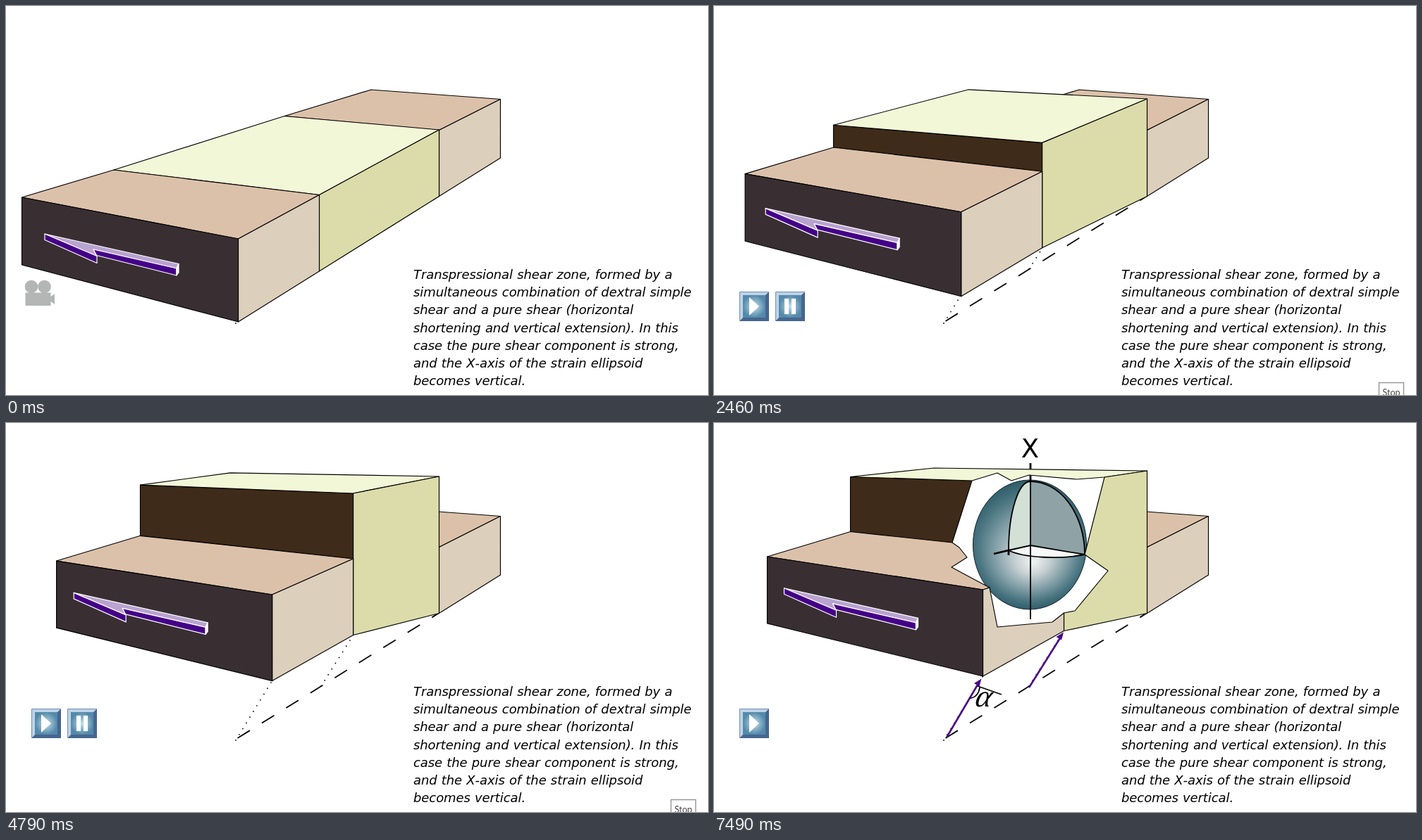
Recreate the animation shown at these times as an HTML page. Size 996x553 px, loop 7.75 s.

```html
<!DOCTYPE html>
<html lang="en">
<head>
<meta charset="utf-8">
<title>Transpressional shear zone</title>
<style>
  html, body { margin: 0; width: 100%; height: 100%; overflow: hidden; background: #fff; }
  svg { display: block; }
  text { font-family: "DejaVu Sans", Verdana, sans-serif; }
  .caption { font-size: 18px; font-style: italic; font-kerning: none; word-spacing: .034em; letter-spacing: -.005em; }
  .alpha { font: italic 44px "Liberation Serif", serif; }
  .stop { font: 12.5px Lato, sans-serif; }
  .face { stroke: #000; stroke-width: 1.15; stroke-linejoin: round; }
  .line { fill: none; stroke: #000; stroke-width: 1.8; }
  .axis { fill: none; stroke: #000; stroke-width: 2.8; }
  .arrow { stroke: #fff; stroke-width: 1.2; stroke-linejoin: round; }
</style>
</head>
<body>
<svg width="996" height="553" viewBox="0 0 996 553">
  <defs>
    <radialGradient id="ball" gradientUnits="userSpaceOnUse" cx="448" cy="173" r="94" fx="453" fy="198">
      <stop offset="0" stop-color="#f0f2f2"/>
      <stop offset=".25" stop-color="#cad2d4"/>
      <stop offset=".55" stop-color="#83a0a8"/>
      <stop offset=".8" stop-color="#4a7581"/>
      <stop offset="1" stop-color="#2b5967"/>
    </radialGradient>
    <radialGradient id="glass">
      <stop offset="0" stop-color="#c5e0ea"/>
      <stop offset="1" stop-color="#5389aa"/>
    </radialGradient>
    <g id="button">
      <path d="M0 0H42L36 6H6V36L0 42Z" fill="#bfd3e6"/>
      <path d="M42 0V42H0L6 36H36V6Z" fill="#46668f"/>
      <rect x="5" y="5" width="32" height="32" fill="url(#glass)"/>
      <path d="M.5 41.5V.5H41.5" fill="none" stroke="#6f8fb3"/>
    </g>
    <path id="head" d="M0 0L-10.5 6.5L-3 11Z" fill="#4b0c86"/>
  </defs>

  <path class="line" d="M328.5 448L614.5 270" stroke-dasharray="20.6 20"/>
  <path class="line" d="M326 451L381.5 360M447 374L496.5 295.5" stroke-dasharray="0 9.6" stroke-linecap="round"/>

  <path class="face" fill="#dcc1aa" d="M395 156.5L518 119L701.5 132.5L614.5 176.5Z"/>
  <path class="face" fill="#dccfbc" d="M614.5 176.5L701.5 132.5V216L614.5 270.5Z"/>

  <polygon id="hole" fill="#fff"/>
  <g id="sphere">
    <ellipse cx="448" cy="173" rx="80.5" ry="92" fill="url(#ball)" stroke="#10242a"/>
    <path fill="#d2e0d6" d="M449 83A31 98 0 0 0 418 181L449 174Z"/>
    <path fill="#8fa3a6" d="M449 83A77 104 0 0 1 526 187L449 174Z"/>
    <path fill="#f7f8f8" d="M418 181L449 174L526 187C492 194 440 192 418 181Z"/>
    <path class="line" d="M449 83A31 98 0 0 0 418 181C440 192 492 194 526 187A77 104 0 0 0 449 83"/>
    <path class="line" d="M449 60V279M418 181L449 174L526 187"/>
    <path class="axis" d="M449 57V82M397 186L418 181V188M535 188.5L560 193.5"/>
  </g>

  <g id="block"></g>

  <g id="arrow" class="arrow">
    <path fill="#b9a3d0" d="M55 324L245 366.5L242 373L124 346L129 355.5Z"/>
    <path fill="#440088" d="M55 324L129 355.5V365.5L55 332.5Z"/>
    <path fill="#440088" d="M124 346L242 373V383L128.5 354.5Z"/>
    <path fill="#fff" d="M242 373L245 366.5V379L242 383Z"/>
  </g>

  <g id="camera" fill="#b4b6b5">
    <circle cx="36" cy="399" r="9.3"/>
    <circle cx="54.5" cy="399" r="9.3"/>
    <path d="M27.5 407.5H63.5V413L69 409.5V424L63.5 420V426H27.5Z"/>
  </g>
  <g id="play" transform="translate(36 406)">
    <use href="#button"/>
    <path d="M14 8L28 21L14 34Z" fill="#fff"/>
  </g>
  <g id="pause" transform="translate(87 406)">
    <use href="#button"/>
    <path d="M13 10H19V32H13ZM23 10H29V32H23Z" fill="#fff"/>
  </g>

  <g id="labels">
    <text x="448.5" y="49" font-size="37" text-anchor="middle">X</text>
    <path d="M330 447L377 367M447 376L494 301" stroke="#4b0c86" stroke-width="2.6"/>
    <use href="#head" x="379.5" y="363.5"/>
    <use href="#head" x="496" y="297.5"/>
    <path class="line" d="M374 374L408 386M363 391C371 391 376 384 377 376"/>
    <text class="alpha" transform="translate(369 403) skewX(-12)">α</text>
  </g>

  <g id="caption" class="caption"></g>
  <g id="stop">
    <rect x="943.5" y="535.5" width="35" height="24" fill="#fff" stroke="#999" stroke-width="1.5"/>
    <text class="stop" x="961" y="554" text-anchor="middle" fill="#444">Stop</text>
  </g>
</svg>
<script>
const LOOP = 7750, START = 800, PAIR = 331, SHORT = 130;
const SLIDES = 27, CUTS = 9;

const $ = id => document.getElementById(id);
const add = (parent, tag, attrs) => {
  const el = document.createElementNS("http://www.w3.org/2000/svg", tag);
  for (const k in attrs) el.setAttribute(k, attrs[k]);
  return parent.appendChild(el);
};
const show = (id, on) => { $(id).style.opacity = +on; };
const mix = (a, b, k) => [a[0] + (b[0] - a[0]) * k, a[1] + (b[1] - a[1]) * k];
const dist = (a, b) => Math.hypot(b[0] - a[0], b[1] - a[1]);

// Block corners: x, y and how far each one travels
const corners = {
  frontLeft: [22.5, 272, 53, -82],
  front: [329.5, 331, 52, -94],
  frontFoot: [329.5, 449, 52, -89],
  leftFoot: [22.5, 368, 53, -83],
  side: [444.5, 268.5, 52, -81.5],
  sideFoot: [444.5, 377, 52, -81.5],
  inner: [153, 233, 40.5, -78.5],
  topLeft: [153, 233, 40.5, -156.5],
  topFront: [444.5, 268.5, 52, -182],
  topRight: [614.5, 176, 0, -108],
  topBack: [395, 156.5, -83, -92.5],
  base: [614.5, 270.5, 0, 0]
};
const corner = (name, k) => {
  const [x, y, dx, dy] = corners[name];
  return [x + dx * k, y + dy * k];
};
const end = {};
for (const name in corners) end[name] = corner(name, 1);
const { frontLeft, front, frontFoot, side, sideFoot, inner, topLeft, topFront, topRight, topBack, base } = end;

// Opening around the ellipsoid, clockwise from the upper left
const hole = [
  [366, 82], [402, 71], [422, 82], [447, 74], [515, 80], [554, 77],
  [526, 187], [559, 210], [512, 267], [496.5, 270], [480, 283],
  [402, 290], [391, 234], [337, 205], [359, 191], [348, 177], [338, 170]
];
$("hole").setAttribute("points", hole.join(" "));

function walk(path, d) {
  let i = 0;
  while (i < path.length - 2 && d > dist(path[i], path[i + 1])) d -= dist(path[i], path[++i]);
  return mix(path[i], path[i + 1], d / dist(path[i], path[i + 1]));
}
const lengths = path => {
  let sum = 0;
  return path.map((p, i) => sum += i ? dist(path[i - 1], p) : 0);
};

// Each morph point is a [from, to] pair
const keep = p => [p, p];
const spread = (targets, path) => {
  const at = lengths(targets), scale = lengths(path).pop() / at[at.length - 1];
  return targets.map((p, i) => [walk(path, at[i] * scale), p]);
};
const turn = (prev, p, next, k = 0.2) => [[mix(p, prev, k), p], [p, mix(p, next, 0.12)]];

const faces = [
  { fill: "#3f2b19", quad: ["topLeft", "topFront", "side", "inner"],
    cut: [keep(topLeft), ...spread([hole[0], hole[16], hole[13]], [topFront, side]), keep(inner)] },
  { fill: "#f2f7d8", quad: ["topLeft", "topBack", "topRight", "topFront"],
    cut: [keep(topLeft), keep(topBack), keep(topRight),
      ...spread(hole.slice(0, 6).reverse(), [hole[5], topFront, hole[0]])] },
  { fill: "#dcdcaa", quad: ["topFront", "topRight", "base", "sideFoot"],
    cut: [keep(topRight),
      ...spread(hole.slice(5, 10), [mix(topRight, base, 0.27), base, mix(base, sideFoot, 0.85)]),
      keep(sideFoot),
      ...spread([base, mix(topRight, base, 0.55)], [mix(topFront, sideFoot, 0.41), topFront])] },
  { fill: "#dcc1aa", quad: ["frontLeft", "inner", "side", "front"],
    cut: [keep(frontLeft), ...turn(frontLeft, inner, side),
      ...spread([...hole.slice(13).reverse(), mix(hole[13], hole[12], 0.42), hole[12]],
        [mix(inner, side, 0.67), side, mix(side, front, 0.34)]),
      ...turn(side, front, frontLeft, 0.5)] },
  { fill: "#dccfbc", quad: ["front", "side", "sideFoot", "frontFoot"],
    cut: [keep(front),
      ...spread([hole[12], hole[11], mix(hole[11], hole[10], 0.6), hole[10], hole[9]],
        [mix(front, side, 0.09), side, mix(side, sideFoot, 0.54)]),
      ...turn(side, sideFoot, frontFoot), ...turn(sideFoot, frontFoot, front)] },
  { fill: "#392f32", quad: ["frontLeft", "front", "frontFoot", "leftFoot"] }
];
for (const f of faces) f.el = add($("block"), "polygon", { class: "face", fill: f.fill });

[
  "Transpressional shear zone, formed by a",
  "simultaneous combination of dextral simple",
  "shear and a pure shear (horizontal",
  "shortening and vertical extension). In this",
  "case the pure shear component is strong,",
  "and the X-axis of the strain ellipsoid",
  "becomes vertical."
].forEach((line, i) => {
  add($("caption"), "text", { x: 578, y: Math.round(388 + i * 25.2) }).textContent = line;
});

// Poses alternate between a short and a long hold
function stepAt(t) {
  if (t < START) return 0;
  const d = t - START;
  return Math.min(2 * Math.floor(d / PAIR) + (d % PAIR < SHORT ? 1 : 2), SLIDES + CUTS);
}

function draw(t) {
  const n = stepAt(t);
  const slide = Math.min(n, SLIDES) / SLIDES;
  const cut = Math.max(0, n - SLIDES) / CUTS;
  for (const f of faces) {
    const points = cut && f.cut
      ? f.cut.map(([a, b]) => mix(a, b, cut))
      : f.quad.map(name => corner(name, slide));
    f.el.setAttribute("points", points.join(" "));
  }
  $("arrow").setAttribute("transform", `translate(${44.5 * slide} ${-89.2 * slide})`);
  show("camera", n === 0);
  show("play", n > 0);
  show("pause", n > 0 && !cut);
  show("sphere", cut > 0);
  show("hole", cut === 1);
  show("labels", cut === 1);
  show("stop", t < 2000 || t >= 7490 ? 0 : t < 2060 || t >= 7420 ? 0.5 : 1);
}

function tick() {
  draw(performance.now() % LOOP);
  requestAnimationFrame(tick);
}
tick();
</script>
</body>
</html>
```
